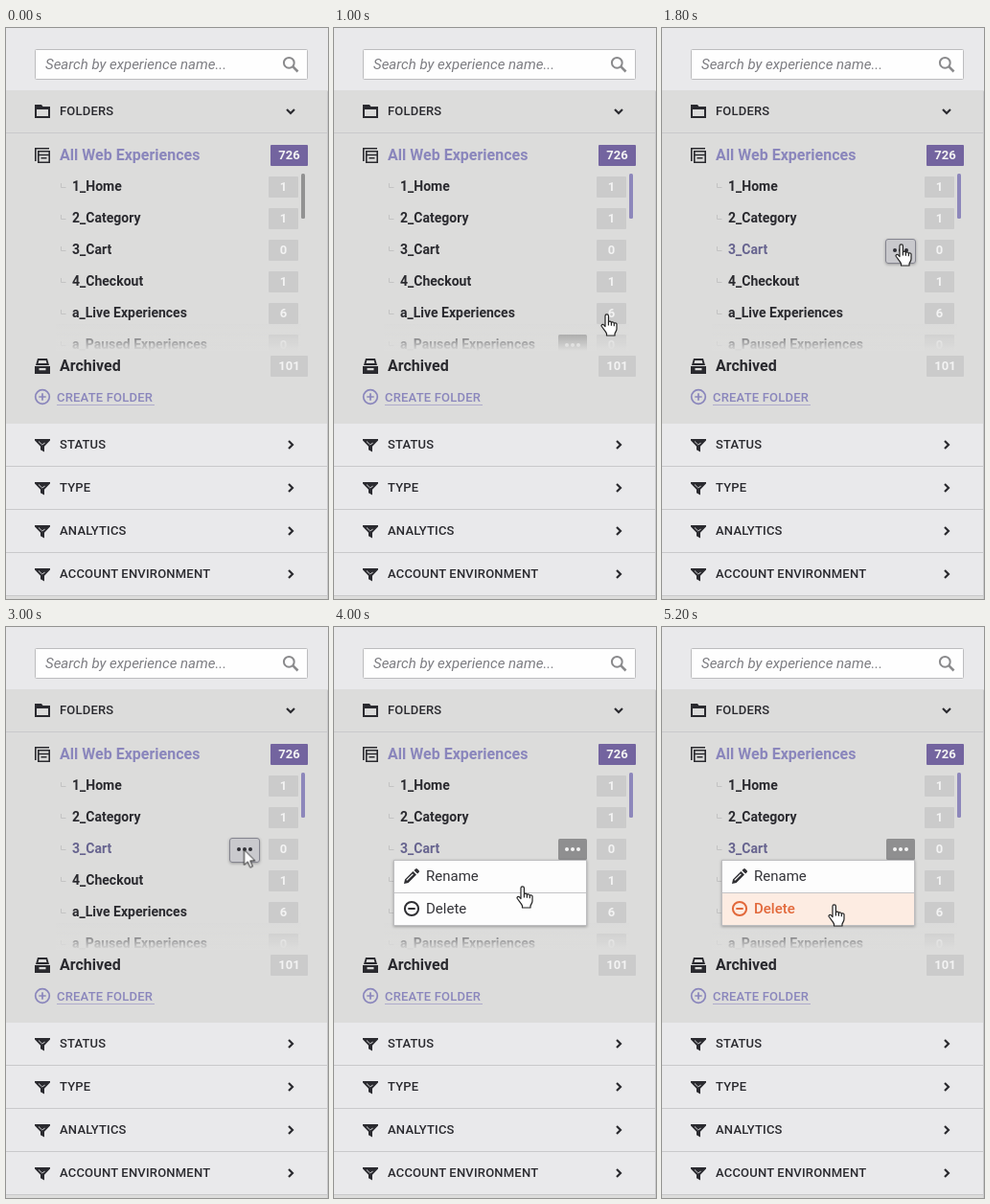
An HTML page that plays this animation: 336x596 px, repeating every 6.6 s.

```html
<!DOCTYPE html>
<html lang="en">
<head>
<meta charset="utf-8">
<title>Folder menu</title>
<style>
  html, body { margin: 0; width: 100%; height: 100%; overflow: hidden; background: #e9e9eb; }
  svg { display: block; width: 100%; height: 100%; }
  text { font-family: Roboto, "Liberation Sans", sans-serif; fill: #2a2a2f; }
  .search { font-size: 15px; font-style: italic; fill: #7d7d82; }
  .head { font-size: 13px; font-weight: 500; letter-spacing: .2px; }
  .big { font-size: 16px; font-weight: 700; }
  .row { font-size: 14px; font-weight: 700; }
  .num { font-size: 13px; font-weight: 700; fill: #f3f3f3; text-anchor: middle; }
  .item { font-size: 15px; fill: #333338; }
  .violet { fill: #8a86bc; }
  .badge { fill: #cbcbcb; }
  .line { fill: none; stroke: #2a2a2f; stroke-width: 2.2; }

  /* Every change is a hard step on one shared 6.6 s loop */
  .step { animation: 6.6s step-end infinite; }
  .bar { animation-name: bar; }
  .checkout { animation-name: checkout; }
  .cart { animation-name: cart; }
  .b-checkout { animation-name: showCheckout; }
  .b-paused { animation-name: showPaused; }
  .b-cart { animation-name: showCart; }
  .b-hot { animation-name: showHot; }
  .menu { animation-name: menu; }
  .danger { animation-name: danger; }
  .calm { animation-name: calm; }
  .pointer { animation-name: move; }
  .hand { animation-name: hand; }
  .arrow { animation-name: arrow; }

  @keyframes bar { 0% { fill: #929292 } 15.15%, 100% { fill: #8d87bb } }
  @keyframes checkout { 0%, 21.21%, 100% { fill: #2a2a2f } 18.18% { fill: #67648f } }
  @keyframes cart { 0% { fill: #2a2a2f } 21.21%, 100% { fill: #67648f } }
  @keyframes showPaused { 0%, 18.18%, 100% { opacity: 0 } 15.15% { opacity: 1 } }
  @keyframes showCheckout { 0%, 21.21%, 100% { opacity: 0 } 18.18% { opacity: 1 } }
  @keyframes showCart { 0% { opacity: 0 } 21.21%, 100% { opacity: 1 } }
  @keyframes showHot { 0%, 57.57%, 100% { opacity: 0 } 24.24% { opacity: 1 } }
  @keyframes menu { 0% { opacity: 0 } 48.48% { opacity: .95 } 51.51%, 100% { opacity: 1 } }
  @keyframes danger { 0% { opacity: 0 } 69.69% { opacity: .9 } 72.72%, 100% { opacity: 1 } }
  @keyframes calm { 0% { opacity: 1 } 69.69%, 100% { opacity: 0 } }
  @keyframes hand {
    0%, 33.33%, 45.45%, 66.66% { opacity: 0 }
    12.12%, 36.36%, 54.54%, 69.69%, 100% { opacity: 1 }
  }
  @keyframes arrow {
    0%, 12.12%, 36.36%, 54.54%, 69.69%, 100% { opacity: 0 }
    9.09%, 33.33%, 45.45%, 66.66% { opacity: 1 }
  }
  @keyframes move {
    0%, 9.09% { transform: translate(294px, 580px) }
    12.12% { transform: translate(285px, 440px) }
    15.15% { transform: translate(278px, 298px) }
    18.18% { transform: translate(262px, 262px) }
    21.21% { transform: translate(252px, 238px) }
    24.24% { transform: translate(246px, 229px) }
    27.27% { transform: translate(243px, 225px) }
    33.33% { transform: translate(251px, 231px) }
    36.36% { transform: translate(243px, 232px) }
    45.45% { transform: translate(248.5px, 232.5px) }
    54.54% { transform: translate(233.5px, 234px) }
    57.57% { transform: translate(208px, 254px) }
    60.6% { transform: translate(190px, 270px) }
    66.66% { transform: translate(179.5px, 286.5px) }
    69.69%, 100% { transform: translate(173px, 289px) }
  }
</style>
</head>
<body>
<svg viewBox="0 0 336 596" xmlns="http://www.w3.org/2000/svg">
  <defs>
    <linearGradient id="fade" x1="0" y1="0" x2="0" y2="1">
      <stop offset="0" stop-color="#dcdcdb" stop-opacity="0"/>
      <stop offset="1" stop-color="#dcdcdb"/>
    </linearGradient>
    <filter id="soft" x="-10%" y="-20%" width="120%" height="150%">
      <feDropShadow dx="0" dy="1" stdDeviation="1.5" flood-color="#000" flood-opacity=".3"/>
    </filter>
    <clipPath id="list"><path d="M50 148h270v189H50z"/></clipPath>
    <path id="branch" d="M57.5 162v4.5h5" fill="none" stroke="#c3c3c3"/>
    <rect id="tag" class="badge" x="274" y="155" width="31" height="22" rx="1"/>
    <path id="next" class="line" d="M295 431l4 4-4 4"/>
    <g id="funnel">
      <path d="M30 429h16v1.6l-6 6.2v5.6l-4-2.2v-3.4l-6-6.2z" fill="#2a2a2f"/>
      <path d="M34 431.5l3.6 3.4 3-1.7" fill="none" stroke="#cfcfd2"/>
    </g>
    <g id="dots">
      <circle cx="243" cy="232" r="2"/><circle cx="249" cy="232" r="2"/><circle cx="255" cy="232" r="2"/>
    </g>
    <g id="more">
      <rect x="234" y="221" width="30" height="22" rx="1.5" fill="#8f8f90"/>
      <use href="#dots" fill="#f4f4f4"/>
    </g>
    <g id="minus" fill="none" stroke-width="2">
      <circle cx="81" cy="294" r="7.1"/><path d="M77.3 294h7.4"/>
    </g>
  </defs>

  <!-- Panels -->
  <path d="M0 0h336v596H0z" fill="#e9e9eb"/>
  <path d="M0 65h336v348H0zM0 593h336v3H0z" fill="#dcdcdb"/>
  <path d="M0 109.5h336M0 457.5h336M0 502.5h336M0 547.5h336M0 592.5h336M335.5 66V596" stroke="#c9c9cb"/>

  <!-- Search -->
  <rect x="30.5" y="22.5" width="284" height="31" rx="1" fill="#fefefe" stroke="#bcbcbe"/>
  <text class="search" x="41" y="43">Search by experience name...</text>
  <g fill="none" stroke="#8a8a8c" stroke-width="2">
    <circle cx="295.3" cy="36.3" r="5.4"/><path d="M299.2 40.2l5.3 5.3" stroke-width="2.6"/>
  </g>

  <!-- Folders -->
  <path d="M30 80h7l1.5 2H46v12H30zM32 85v7h12v-7z" fill="#2a2a2f" fill-rule="evenodd"/>
  <text class="head" x="56" y="91">FOLDERS</text>
  <path class="line" d="M293 85l4 4 4-4"/>

  <g fill="none" stroke="#2a2a2f" stroke-width="1.6">
    <path d="M30.8 139V125.8H45"/>
    <path d="M33.8 128.8h11.4v11.4H33.8zM34 132.5h11M36.5 135.8h6" />
  </g>
  <text class="big violet" x="56" y="138">All Web Experiences</text>
  <rect x="276" y="122" width="39" height="22" rx="1" fill="#73649f"/>
  <text class="num" x="295.5" y="137">726</text>

  <g clip-path="url(#list)">
    <g>
      <use href="#branch"/><text class="row" x="69" y="170">1_Home</text>
      <use href="#tag"/><text class="num" x="289.5" y="170">1</text>
    </g>
    <g transform="translate(0 33)">
      <use href="#branch"/><text class="row" x="69" y="170">2_Category</text>
      <use href="#tag"/><text class="num" x="289.5" y="170">1</text>
    </g>
    <g transform="translate(0 66)">
      <use href="#branch"/><text class="row step cart" x="69" y="170">3_Cart</text>
      <use href="#tag"/><text class="num" x="289.5" y="170">0</text>
    </g>
    <g transform="translate(0 99)">
      <use href="#branch"/><text class="row step checkout" x="69" y="170">4_Checkout</text>
      <use href="#tag"/><text class="num" x="289.5" y="170">1</text>
    </g>
    <g transform="translate(0 132)">
      <use href="#branch"/><text class="row" x="69" y="170">a_Live Experiences</text>
      <use href="#tag"/><text class="num" x="289.5" y="170">6</text>
    </g>
    <g transform="translate(0 165)">
      <use href="#branch"/><text class="row" x="69" y="170">a_Paused Experiences</text>
      <use href="#tag"/><text class="num" x="289.5" y="170">0</text>
    </g>
    <g class="step b-paused"><use href="#more" y="99"/></g>
    <g class="step b-checkout"><use href="#more" y="33"/></g>
    <path d="M52 309h256v28H52z" fill="url(#fade)"/>
  </g>
  <rect class="step bar" x="308" y="152" width="4" height="47" rx="1.5"/>

  <g class="step b-cart"><use href="#more"/></g>
  <g class="step b-hot">
    <rect x="233.5" y="220.5" width="31" height="25" rx="2.5" fill="#c9c9cd" stroke="#85858f" filter="url(#soft)"/>
    <use href="#dots" fill="#303036"/>
  </g>

  <path d="M33 345h10l2 7H31zM34.3 347l-.8 3h9l-.8-3zM30 353h16v8H30zM34.5 355v2.2h7V355z" fill="#2a2a2f" fill-rule="evenodd"/>
  <text class="big" x="56" y="358">Archived</text>
  <rect class="badge" x="276" y="342" width="39" height="22" rx="1"/>
  <text class="num" x="295.5" y="357">101</text>

  <path d="M34.3 385h7.4M38 381.3v7.4M30.7 385a7.3 7.3 0 1 0 14.6 0a7.3 7.3 0 1 0-14.6 0" fill="none" stroke="#8a86bc" stroke-width="1.7"/>
  <text class="head violet" x="53" y="390">CREATE FOLDER</text>
  <path d="M53 393.5h102" stroke="#aeabcb"/>

  <!-- Filters -->
  <use href="#funnel"/><use href="#next"/>
  <text class="head" x="56" y="439">STATUS</text>
  <use href="#funnel" y="45"/><use href="#next" y="45"/>
  <text class="head" x="56" y="484">TYPE</text>
  <use href="#funnel" y="90"/><use href="#next" y="90"/>
  <text class="head" x="56" y="529">ANALYTICS</text>
  <use href="#funnel" y="135"/><use href="#next" y="135"/>
  <text class="head" x="56" y="574">ACCOUNT ENVIRONMENT</text>

  <!-- Context menu -->
  <g class="step menu">
    <rect x="62.5" y="243.5" width="201" height="68" fill="#fdfdfd" stroke="#bdbdbf" filter="url(#soft)"/>
    <path d="M73 268l1-4.6 8.4-8.4 3.6 3.6-8.4 8.4zM83.5 254l1.6-1.6q.9-.8 1.8 0l1.8 1.8q.8.9 0 1.8l-1.6 1.6z" fill="#2f2f33"/>
    <path d="M75.8 264.4l6.6-6.6" stroke="#fdfdfd" stroke-width="1.2"/>
    <text class="item" x="96" y="265">Rename</text>
    <g class="step calm">
      <use href="#minus" stroke="#2f2f33"/>
      <text class="item" x="96" y="299">Delete</text>
    </g>
    <g class="step danger">
      <path d="M63 278h200v33H63z" fill="#fdece2"/>
      <use href="#minus" stroke="#e2683a"/>
      <text class="item" x="96" y="299" style="fill:#e2683a;font-weight:500">Delete</text>
    </g>
    <path d="M63 277.5h200" stroke="#c4c4c6"/>
  </g>

  <!-- Pointer -->
  <g class="step pointer" fill="#fff" stroke="#222" stroke-linejoin="round">
    <g class="step hand" stroke-width="1.2">
      <path d="M5 2.5a1.7 1.7 0 0 1 3.4 0V9a1.6 1.6 0 0 1 3 .6 1.6 1.6 0 0 1 2.9.9 1.5 1.5 0 0 1 2.7 1.2V16c0 2-1.5 3.5-2 5v2H6.5v-2C5.5 18.5 3 16 1.3 13.5c-.9-1.5.8-2.8 2.2-1.6L5 13.5z"/>
      <path d="M8.4 9v3.5M11.4 9.8v3M14.3 10.7v2.6" fill="none"/>
    </g>
    <path class="step arrow" d="M0 0v16l3.7-3.5 2.6 6 2.6-1.1-2.6-5.9h5z"/>
  </g>
</svg>
</body>
</html>
```
